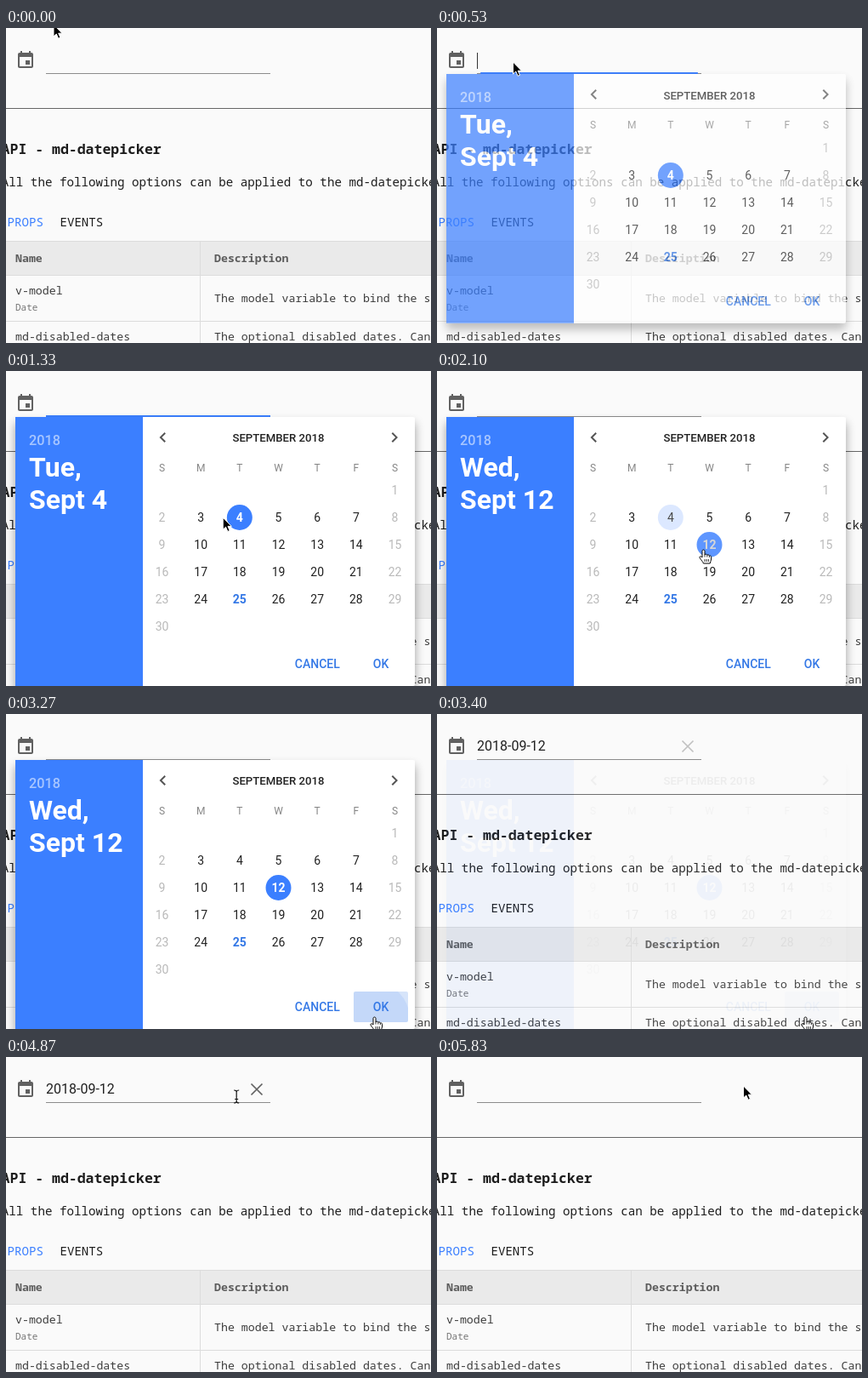
These frames come from a looping animation (500 by 370 pixels, 6.47 s). An HTML page:

```html
<!DOCTYPE html>
<html lang="en">
<head>
<meta charset="utf-8">
<title>Date picker</title>
<style>
  html, body { margin: 0; width: 100%; height: 100%; overflow: hidden; background: #fafafa; }
  svg { display: block; width: 500px; height: 370px; }
  text { font-family: Roboto, sans-serif; white-space: pre; }
  .mono text { font-family: "Noto Sans Mono", "DejaVu Sans Mono", monospace; }
  .mid { text-anchor: middle; }
</style>
</head>
<body>
<svg viewBox="0 0 500 370">
  <defs>
    <filter id="blur" x="-20%" y="-20%" width="140%" height="140%"><feGaussianBlur stdDeviation="6"/></filter>
    <clipPath id="okClip"><rect x="409" y="326" width="64" height="36" rx="2"/></clipPath>
  </defs>
  <rect width="500" height="370" fill="#fafafa"/>

  <g id="field">
    <path fill="#616161" transform="translate(11 26)" d="M17 12h-5v5h5v-5zM16 1v2H8V1H6v2H5c-1.11 0-1.99.9-1.99 2L3 19c0 1.1.89 2 2 2h14c1.1 0 2-.9 2-2V5c0-1.1-.9-2-2-2h-1V1h-2zm3 18H5V8h14v11z"/>
    <rect x="47" y="53" width="264" height="1" fill="#8c8c8c"/>
    <rect id="focus" x="-132" y="52" width="264" height="2" fill="#3b7fff"/>
    <rect id="caret" x="47" y="29" width="1" height="19" fill="#333"/>
    <text id="value" x="47" y="43" font-size="16" fill="#212121">2018-09-12</text>
    <circle id="clearRipple" cx="295" cy="38" fill="#000"/>
    <path id="clear" d="M288.5 31.5l13 13M301.5 31.5l-13 13" stroke="#616161" stroke-width="1.7"/>
  </g>

  <g class="mono" fill="#1c1c1c">
    <rect y="94" width="500" height="1" fill="#666"/>
    <text x="-5.4" y="148" font-size="16.5" font-weight="700">API - md-datepicker</text>
    <text x="-5.2" y="186" font-size="14.2">All the following options can be applied to the md-datepicker</text>
    <text x="1.6" y="233" font-size="14.1" font-weight="500" fill="#3b7fff">PROPS</text>
    <text x="63.5" y="233" font-size="14.1" font-weight="500">EVENTS</text>
    <rect y="250" width="500" height="40" fill="#eaeaea"/>
    <path d="M0 250.5H500M0 290.5H500M0 344.5H500M228.5 250V370" stroke="#dcdcdc"/>
    <g font-size="13.25" fill="#3c3c3c">
      <g font-weight="700" fill="#5c5c5c">
        <text x="11" y="275">Name</text>
        <text x="245" y="275">Description</text>
      </g>
      <text x="11" y="313">v-model</text>
      <text x="11" y="331.5" font-size="11" fill="#757575">Date</text>
      <text x="245" y="322">The model variable to bind the selected</text>
      <text x="11" y="367">md-disabled-dates</text>
      <text x="245" y="367">The optional disabled dates. Can be</text>
    </g>
  </g>

  <g id="dialog">
    <rect class="tall" x="11" y="61" width="470" fill="#000" opacity=".36" filter="url(#blur)"/>
    <rect class="tall" x="11" y="54" width="470" rx="2" fill="#fff"/>
    <rect class="tall" x="11" y="54" width="150" fill="#3b7fff"/>
    <text x="27" y="87" font-size="16.3" font-weight="500" fill="#fff" opacity=".55">2018</text>
    <g font-size="32" font-weight="700" fill="#fff">
      <text id="dayName" x="27" y="124"></text>
      <text id="dayDate" x="27" y="162"></text>
    </g>
    <path fill="#555" transform="translate(172.5 66)" d="M15.41 7.41L14 6l-6 6 6 6 1.41-1.41L10.83 12z"/>
    <path fill="#555" transform="translate(445 66)" d="M10 6L8.59 7.41 13.17 12l-4.58 4.59L10 18l6-6z"/>
    <g id="week" class="mid" font-size="12" fill="#858585"></g>
    <g id="days" class="mid" font-size="14">
      <text x="320.5" y="83" font-size="13.2" font-weight="500" fill="#212121">SEPTEMBER 2018</text>
    </g>
    <g id="footer" class="mid" font-size="14" font-weight="500" fill="#3478e6">
      <g clip-path="url(#okClip)">
        <rect id="okHover" x="409" y="326" width="64" height="36" fill="#3478e6"/>
        <circle id="okRipple" cx="434" cy="356" fill="#3478e6" opacity=".11"/>
      </g>
      <text x="366.3" y="349">CANCEL</text>
      <text x="441" y="349">OK</text>
    </g>
  </g>

  <g id="cursor">
    <path id="arrow" fill="#000" stroke="#fff" d="M0 0V14L3.3 11 5.6 16.3 8 15.3 5.7 10.2H10Z"/>
    <g id="hand" stroke="#000" stroke-linejoin="round">
      <path fill="#fff" d="M-2 1.5C-2-.5 1-.5 1 1.5V6C1.2 4.8 3.6 4.8 3.8 6.4 4.4 5.4 6.2 5.8 6.4 7.2 7.2 6.6 8.6 7 8.6 8.6V11C8.6 13 7.4 14 7.2 16H-.6C-1 14-3 12.6-4.8 9.6-5.6 8-4 7.2-2.8 8.2L-2 9Z"/>
      <path fill="none" stroke-width=".8" d="M1 6V8.5M3.8 6.5V8.5M6.4 7.2V9M1 11V14M3.2 11V14M5.4 11V14"/>
    </g>
    <path id="beam" fill="none" stroke="#111" stroke-width="1.2" d="M-3-7.5Q0-7.5 0-5.5 0-7.5 3-7.5M0-6V6M-3 7.5Q0 7.5 0 5.5 0 7.5 3 7.5M-2 3H2"/>
  </g>
</svg>
<script>
const LOOP = 6470, BLUE = [59, 127, 255];
const $ = id => document.getElementById(id);
const set = (el, attrs) => { for (const k in attrs) el.setAttribute(k, attrs[k]); };
const add = (parent, tag, attrs, text = '') => {
  const el = document.createElementNS('http://www.w3.org/2000/svg', tag);
  set(el, attrs);
  el.textContent = text;
  return parent.appendChild(el);
};
const ramp = (t, from, to) => Math.min(1, Math.max(0, (t - from) / (to - from)));
const easeOut = u => 1 - (1 - u) ** 3;
const during = (t, from, to) => t >= from && t < to;
const show = (id, on) => { $(id).style.display = on ? '' : 'none'; };

// Calendar cells
const colX = c => 183.5 + 45.67 * c;
[...'SMTWTFS'].forEach((d, i) => add($('week'), 'text', { x: colX(i), y: 118.3 }, d));
const picks = {};
for (let d = 1; d <= 30; d++) {
  const col = (d + 5) % 7, x = colX(col), y = 140 + 32 * Math.floor((d + 5) / 7);
  const pick = d === 4 || d === 12;
  const dot = pick && add($('days'), 'circle', { cx: x, cy: y, r: 15, fill: '#3b7fff' });
  const label = add($('days'), 'text', {
    x, y: y + 5,
    fill: d === 25 ? '#3478e6' : col % 6 ? '#212121' : '#b9b9b9',
    'font-weight': d === 25 ? 700 : 400
  }, d);
  if (pick) picks[d] = { dot, label };
}

function paintPick(day, amount) {
  const { dot, label } = picks[day];
  const tone = Math.round(33 + 222 * amount);
  set(dot, { opacity: amount });
  set(label, { fill: `rgb(${tone},${tone},${tone})`, 'font-weight': amount > .5 ? 700 : 400 });
}

// Pointer route: time, x, y
const route = [
  [0, 56, -4], [30, 56, -4], [380, 89.5, 40], [800, 89.5, 40], [1330, 255, 172], [1700, 314, 210],
  [2120, 314, 210], [2670, 411, 318], [2880, 434, 356], [3520, 434, 356], [4030, 372, 197],
  [4330, 184, 46.5], [4500, 184, 46.5], [4870, 271, 46.5], [5120, 295, 41], [5480, 295, 41],
  [5830, 360.5, 34], [LOOP, 360.5, 34]
];
const still = (a, b) => a[1] === b[1] && a[2] === b[2];
function slope(i, k) {
  const a = route[i - 1], p = route[i], b = route[i + 1];
  if (!a || !b || still(a, p) || still(p, b)) return 0;
  return (b[k] - a[k]) / (b[0] - a[0]);
}
function pointer(t) {
  let i = 0;
  while (i < route.length - 2 && t >= route[i + 1][0]) i++;
  const a = route[i], b = route[i + 1], span = b[0] - a[0], u = (t - a[0]) / span;
  const h = u * u * (3 - 2 * u);
  return [1, 2].map(k => a[k] + (b[k] - a[k]) * h
    + span * (slope(i, k) * u * (1 - u) ** 2 - slope(i + 1, k) * u * u * (1 - u)));
}
// Pointer shape from each time on
const shapes = [
  [0, 'arrow'], [300, 'beam'], [480, 'arrow'], [1620, 'hand'], [2260, 'arrow'], [2780, 'hand'],
  [3530, 'arrow'], [4270, 'beam'], [5040, 'hand'], [5620, 'arrow']
];

function draw(t) {
  // Input
  const focusIn = easeOut(ramp(t, 390, 600)), focusOut = ramp(t, 1970, 2080);
  set($('focus'), { transform: `translate(179 0) scale(${.12 + .88 * focusIn} 1)`, opacity: focusIn * (1 - focusOut) });
  show('caret', during(t, 430, 930) || during(t, 1430, 1930));
  const filled = during(t, 3290, 5350);
  show('value', filled);
  show('clear', filled);
  set($('clear'), { opacity: .3 + .7 * ramp(t, 3380, 3600) });
  const splash = ramp(t, 5260, 5560);
  set($('clearRipple'), { r: 16 * easeOut(splash), opacity: .16 * (1 - splash) });

  // Dialog
  const open = during(t, 470, 3440);
  show('dialog', open);
  if (open) {
    set($('dialog'), { opacity: easeOut(ramp(t, 470, 650)) * (1 - ramp(t, 3290, 3430)) ** 1.8 });
    const lift = -32 * (1 - ramp(t, 470, 770)) ** 1.4;
    const drop = lift * 1.4 / 1.4;
    const off = t < 700 ? Math.min(-4, drop) : -4 * (1 - ramp(t, 700, 800));
    document.querySelectorAll('.tall').forEach(r => set(r, { height: 316 + off }));
    set($('footer'), { transform: `translate(0 ${off})` });
    set($('days'), { transform: `translate(0 ${off < -1 ? 1 : 0})` });

    const chosen = t >= 1965;
    $('dayName').textContent = chosen ? 'Wed,' : 'Tue,';
    $('dayDate').textContent = chosen ? 'Sept 12' : 'Sept 4';
    const swap = easeOut(ramp(t, 1970, 2270));
    paintPick(4, 1 - swap);
    paintPick(12, swap);

    set($('okHover'), { opacity: .2 * ramp(t, 2800, 2950) });
    set($('okRipple'), { r: 60 * ramp(t, 3150, 3330) });
  }

  // Pointer
  const [x, y] = pointer(t);
  set($('cursor'), { transform: `translate(${x.toFixed(2)} ${y.toFixed(2)})` });
  const shape = shapes.filter(s => t >= s[0]).pop()[1];
  ['arrow', 'hand', 'beam'].forEach(s => show(s, s === shape));
}

const start = performance.now();
function tick(now) {
  draw(Math.max(0, now - start) % LOOP);
  requestAnimationFrame(tick);
}
draw(0);
requestAnimationFrame(tick);
</script>
</body>
</html>
```
